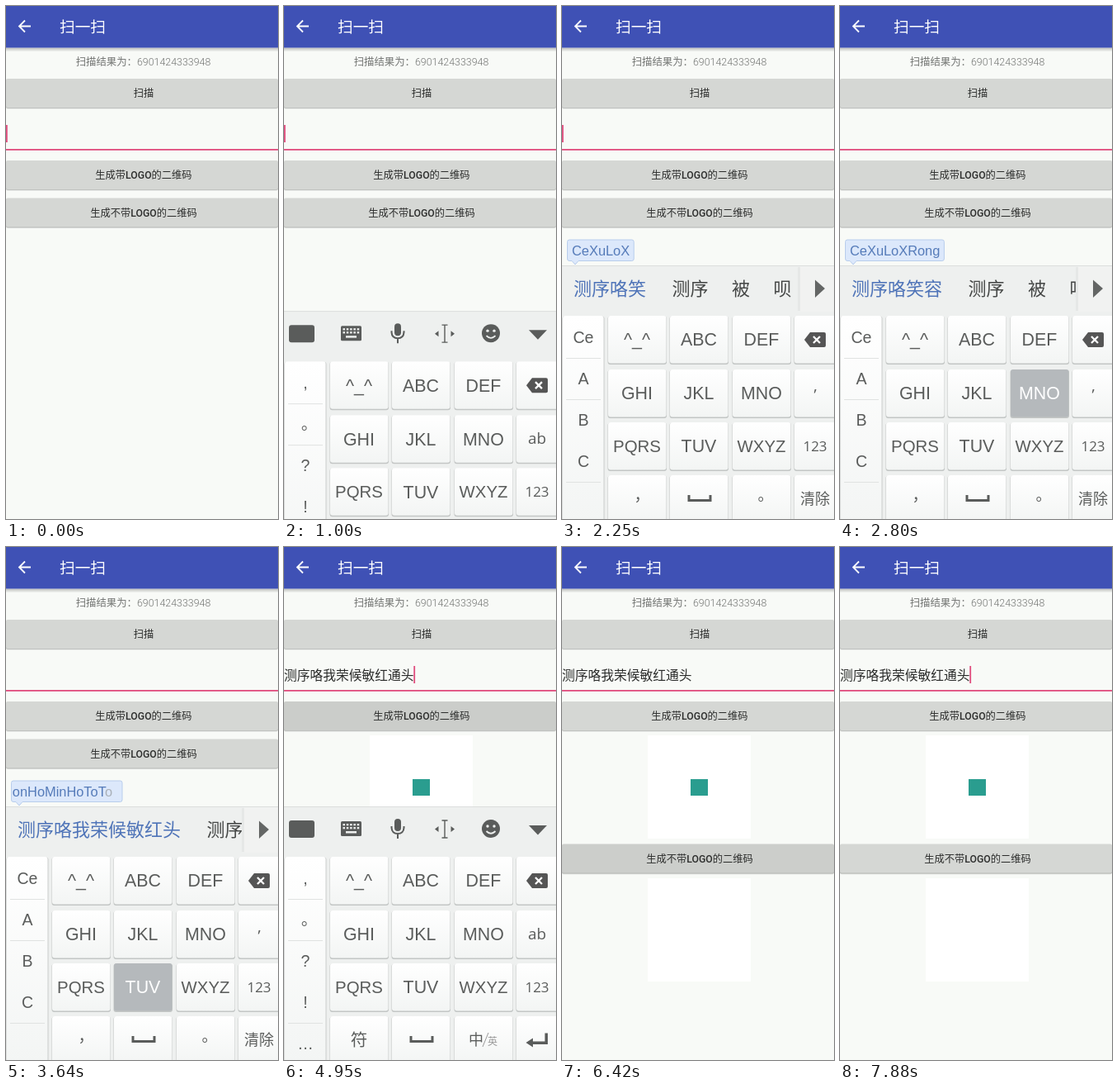
An HTML page for the animation above (8430 ms loop, 330 px wide and 621 px high).

```html
<!DOCTYPE html>
<html lang="zh-CN">
<head>
<meta charset="utf-8">
<title>扫一扫</title>
<style>
html, body { margin: 0; width: 100%; height: 100%; overflow: hidden; background: #f8faf7; }
svg { display: block; width: 330px; height: 621px; }
text { font-family: Roboto, "Noto Sans CJK SC", "Noto Sans CJK", sans-serif; white-space: pre; }
.sans { font-family: "Liberation Sans", "Noto Sans CJK SC", sans-serif; }
.open { font-family: "Open Sans", "Noto Sans CJK SC", sans-serif; }
</style>
</head>
<body>
<svg id="stage" viewBox="0 0 330 621" xmlns="http://www.w3.org/2000/svg">
  <defs>
    <linearGradient id="keyFill" x2="0" y2="1"><stop stop-color="#fff"/><stop offset="1" stop-color="#f3f5f4"/></linearGradient>
    <linearGradient id="barShade" x2="0" y2="1"><stop stop-color="#000" stop-opacity=".24"/><stop offset="1" stop-color="#000" stop-opacity="0"/></linearGradient>
    <clipPath id="buttonClip"><rect width="330" height="35" rx="2"/></clipPath>
    <clipPath id="candidateClip"><rect y="315" width="289" height="55"/></clipPath>
    <clipPath id="bubbleClip"><rect x="7" y="283" width="134" height="26"/></clipPath>
  </defs>
</svg>
<script>
const LOOP = 8430;
const stage = document.getElementById('stage');
const INK = '#5a5c5b', BLUE = '#4f74b8', PINK = '#e04c7d';

function add(parent, tag, attrs = {}, content) {
  const node = document.createElementNS('http://www.w3.org/2000/svg', tag);
  for (const name in attrs) node.setAttribute(name, attrs[name]);
  if (content !== undefined) node.textContent = content;
  parent.appendChild(node);
  return node;
}
const group = (parent, attrs) => add(parent, 'g', attrs);
const rect = (parent, x, y, width, height, fill, more) => add(parent, 'rect', { x, y, width, height, fill, ...more });
const path = (parent, d, fill, more) => add(parent, 'path', { d, fill, ...more });
const stroke = (parent, d, color, width, more) => path(parent, d, 'none', { stroke: color, 'stroke-width': width, ...more });
// Places a label by its vertical centre.
const label = (parent, x, cy, size, fill, content, more) =>
  add(parent, 'text', { x, y: cy + size * .37, 'font-size': size, fill, 'text-anchor': 'middle', ...more }, content);
const show = (node, on) => node.setAttribute('display', on ? 'inline' : 'none');

// Page
rect(stage, 0, 0, 330, 621, '#f8faf7');
rect(stage, 0, 50.5, 330, 5, 'url(#barShade)');
rect(stage, 0, 0, 330, 50.5, '#3f51b5');
stroke(stage, 'M30 24.5H16.5M23 17.5L16 24.5L23 31.5', '#fff', 1.8);
label(stage, 65, 25, 18.7, '#fff', '扫一扫', { 'text-anchor': 'start', 'font-weight': 350 });
label(stage, 166.5, 67.7, 12.4, '#737573', '扫描结果为：6901424333948', { 'font-weight': 300 });

function button(y, caption) {
  const g = group(stage, { transform: `translate(0 ${y})` });
  rect(g, 0, 1.6, 330, 35, '#000', { rx: 2, opacity: .12 });
  rect(g, 0, .8, 330, 35, '#000', { rx: 2, opacity: .16 });
  rect(g, 0, 0, 330, 35, '#d5d7d4', { rx: 2 });
  const ripple = add(g, 'circle', { cx: 167, cy: 18, r: 0, 'clip-path': 'url(#buttonClip)' });
  label(g, 167, 17.6, 12.25, '#2c2d2c', caption, { 'font-weight': 500 });
  return { g, ripple };
}
button(88, '扫描');
const logoButton = button(187, '生成带LOGO的二维码');
const plainButton = button(232.5, '生成不带LOGO的二维码');

const entry = label(stage, 0, 155, 15.75, '#2b2c2b', '测序咯我荣候敏红通头', { 'text-anchor': 'start' });
rect(stage, 0, 173, 330, 1.8, PINK);
const caret = rect(stage, 0, 144, 1.8, 21, PINK);

const logoPanel = group(stage);
rect(logoPanel, 104, 228, 125, 125, '#fff');
rect(logoPanel, 156, 281, 21, 20, '#2a9d8f');
const plainPanel = rect(stage, 104, 401, 125, 125, '#fff');

// Keyboard
const keyboard = group(stage);
rect(keyboard, 0, 314, 330, 310, '#eef0ef');
rect(keyboard, 0, 314, 330, 1, '#dcdedd');
const idle = group(keyboard), composing = group(keyboard);

const COLUMNS = [56, 131, 207, 282], ROWS = [375, 440, 504, 568];
const keys = {};
function key(col, row, caption, size, cls = 'sans') {
  const x = COLUMNS[col], y = ROWS[row];
  rect(keyboard, x - .5, y + .5, 71.5, 58.5, '#c3c6c5', { rx: 3 });
  const face = rect(keyboard, x, y, 70.5, 57.5, 'url(#keyFill)', { rx: 3 });
  const text = caption && label(keyboard, col === 3 ? 307 : x + 35, y + 28.5, size, INK, caption, { class: cls });
  if (/^[A-Z]+$/.test(caption)) keys[caption] = { face, text };
}
['^_^', 'ABC', 'DEF', '', 'GHI', 'JKL', 'MNO', '', 'PQRS', 'TUV', 'WXYZ', '123', '', '', '', '']
  .forEach((caption, i) => i % 4 === 3
    ? key(3, i >> 2, caption, 17, 'open')
    : key(i % 4, i >> 2, caption, caption.length === 4 ? 20.4 : 21.4));

path(keyboard, 'M294 404L301 395H318Q320 395 320 397V411Q320 413 318 413H301Z', '#555');
stroke(keyboard, 'M305 400L313 408M313 400L305 408', '#fff', 2.3);
stroke(keyboard, 'M154 592V598.5H180V592', INK, 3);

rect(keyboard, .5, 375.5, 51, 250, '#c9cccb', { rx: 3 });
rect(keyboard, 1, 375, 49.5, 250, 'url(#keyFill)', { rx: 3 });
for (const y of [426, 476]) rect(keyboard, 5, y, 42, 1, '#e0e2e1');
const lowerRule = rect(keyboard, 5, 576, 42, 1, '#e0e2e1');
const sideItems = [401, 451, 501, 551, 601].map(y => label(keyboard, 26, y, 19.5, INK, '', { class: 'sans' }));

// State layers sit above the keys.
keyboard.append(idle, composing);

const middle = { class: 'open' };
label(idle, 307, 468, 19, INK, 'ab', middle);
label(idle, 91, 596, 20.5, INK, '符');
label(idle, 233, 596, 18, INK, '中');
stroke(idle, 'M241 605L248 588', '#999', 1);
label(idle, 253, 599, 12, '#999', '英');
path(idle, 'M293.5 600L302 594.5V598.5H316.5V588.5H320V602H302V605.5Z', INK);

label(composing, 307, 470, 19, INK, '’', middle);
label(composing, 97, 592, 19, INK, '，');
label(composing, 247, 592, 19, INK, '。');
label(composing, 307, 596, 18, INK, '清除');

// Tool icons
rect(idle, 6, 331, 31, 21, INK, { rx: 3 });
rect(idle, 69, 332, 25, 18, INK, { rx: 1.5 });
for (let row = 0; row < 2; row++)
  for (let col = 0; col < 5; col++) rect(idle, 71.5 + col * 4.3, 335 + row * 4, 2.5, 2.3, '#eef0ef');
rect(idle, 75, 344, 13, 2.5, '#eef0ef');
rect(idle, 134, 329, 8, 15, INK, { rx: 4 });
stroke(idle, 'M130.5 338V340Q131 347 138 347Q145 347 145.5 340V338M138 347V353', INK, 2);
stroke(idle, 'M191.5 331H198.5M195 331V352M191.5 352H198.5', INK, 1.4);
path(idle, 'M183 341.5L187.5 338V345ZM207 341.5L202.5 338V345Z', INK);
add(idle, 'circle', { cx: 251, cy: 341, r: 11, fill: INK });
add(idle, 'circle', { cx: 247, cy: 338, r: 1.7, fill: '#eef0ef' });
add(idle, 'circle', { cx: 255, cy: 338, r: 1.7, fill: '#eef0ef' });
stroke(idle, 'M245.5 344Q251 349.5 256.5 344', '#eef0ef', 1.8);
path(idle, 'M297 337H319L308 348.5Z', INK);

// Suggestions and the bubble with the typed syllables
const candidateRow = group(composing, { 'clip-path': 'url(#candidateClip)' });
const candidates = Array.from({ length: 6 }, (_, i) =>
  label(candidateRow, 0, 342, 22, i ? '#454746' : BLUE, '', { 'text-anchor': 'start', 'font-weight': 350 }));
rect(composing, 286, 316, 3, 53, '#e6e8e7');
rect(composing, 289, 315, 41, 55, '#f1f2f1');
path(composing, 'M307 331.5L319 342L307 353Z', '#646665');
const bubble = path(composing, '', '#dce8fb', { stroke: '#b8cdec', 'stroke-width': 1 });
const bubbleText = add(group(composing, { 'clip-path': 'url(#bubbleClip)' }), 'text',
  { y: 302, 'font-size': 16.4, fill: '#557bb9', class: 'sans' });
const typedPart = add(bubbleText, 'tspan');
const hintPart = add(bubbleText, 'tspan', { fill: '#a9b0b8' });

// Typing
const SPELLING = 'CeXuLoWRonHoMinHoToTo', EARLY = 'CeXuLoXRong';
const PRESS = 80;
const pressTimes = [1470, 1630, 1710, 1860, 1940, 2020, 2170, 2400, 2480, 2560, 2640, 2800,
  3030, 3110, 3190, 3270, 3340, 3420, 3500, 3640, 3720];
const COMMIT = 4030, TOOLBAR = 4110;

const keyFor = letter => Object.keys(keys).find(name => name.includes(letter.toUpperCase()));
const syllables = text => (text.match(/[A-Z]/g) || []).length;

function phraseFor(count) {
  if (count <= 11) return '测序咯笑容'.slice(0, syllables(EARLY.slice(0, count)));
  const n = syllables(SPELLING.slice(0, count));
  return n >= 10 ? '测序咯我荣候敏红通头' : '测序咯我荣候敏红头'.slice(0, n);
}

let lastCount = -1;
function setComposition(count) {
  if (count === lastCount) return;
  lastCount = count;
  const side = count === 0 ? [',', '｡', '?', '!', '…'] : count === 1 ? ['A', 'B', 'C'] : ['Ce', 'A', 'B', 'C'];
  sideItems.forEach((node, i) => { node.textContent = side[i] || ''; });
  show(lowerRule, side.length > 3);
  show(idle, !count);
  show(composing, count);
  if (!count) return;

  const words = count === 1 ? [...'啊不吧被吹吃'] : [phraseFor(count), '测序', '被', '呗'];
  let x = 14;
  candidates.forEach((node, i) => {
    node.textContent = words[i] || '';
    node.setAttribute('x', x);
    x += (words[i] || '').length * 22 + (i ? 28.5 : 31.5);
  });

  const hinted = count === 19 || count === 20;
  typedPart.textContent = count <= 11 ? EARLY.slice(0, count) : SPELLING.slice(0, hinted ? 20 : count);
  hintPart.textContent = hinted ? 'o' : '';
  const width = bubbleText.getComputedTextLength();
  const scrolled = width > 124;
  const right = scrolled ? 141 : 12 + width + 5;
  bubbleText.setAttribute('x', scrolled ? 129 - width : 12);
  bubble.setAttribute('d', `M9 283H${right - 2.5}Q${right} 283 ${right} 285.5V306Q${right} 308.5 ${right - 2.5} 308.5H20L16 313L12 308.5H9Q6.5 308.5 6.5 306V285.5Q6.5 283 9 283Z`);
}

function setPressed(name) {
  for (const caption in keys) {
    const { face, text } = keys[caption], down = caption === name;
    face.setAttribute('fill', down ? '#b5b9bc' : 'url(#keyFill)');
    text.setAttribute('fill', down ? '#fff' : INK);
  }
}

const ramp = (t, from, to) => Math.min(1, Math.max(0, (t - from) / (to - from)));

function setRipple({ ripple }, t, start, release, end) {
  ripple.setAttribute('r', 180 * ramp(t, start, release));
  ripple.setAttribute('opacity', t < start ? 0 : .05 * (1 - ramp(t, release, end)));
}

const caretSpans = [[0, 450], [920, 1470], [1940, 2400], [2880, 3340], [3800, 4490],
  [4950, 5410], [5960, 6420], [6960, 7420], [7880, LOOP]];

function render(t) {
  const committed = t >= COMMIT;
  show(entry, committed);
  caret.setAttribute('x', committed ? 157.3 : 0);
  show(caret, caretSpans.some(([from, to]) => t >= from && t < to));

  const logoShown = t >= 4870;
  show(logoPanel, logoShown);
  show(plainPanel, t >= 6420);
  plainButton.g.setAttribute('transform', `translate(0 ${logoShown ? 359.6 : 232.5})`);
  setRipple(logoButton, t, 4640, 4930, 5300);
  setRipple(plainButton, t, 6190, 6400, 6540);

  const rise = 1 - (1 - ramp(t, 880, 1090)) ** 2, fall = ramp(t, 5180, 5405) ** 2;
  show(keyboard, t > 880 && t < 5405);
  keyboard.setAttribute('transform', `translate(0 ${307 * (1 - rise + fall)})`);

  const count = t < TOOLBAR ? pressTimes.filter(p => t >= p + PRESS).length : 0;
  setComposition(count);
  const held = pressTimes.findIndex(p => t >= p && t < p + PRESS);
  setPressed(held < 0 ? '' : keyFor(SPELLING[held]));
}

const origin = performance.now();
function tick() {
  render((performance.now() - origin) % LOOP);
  requestAnimationFrame(tick);
}
tick();
</script>
</body>
</html>
```
